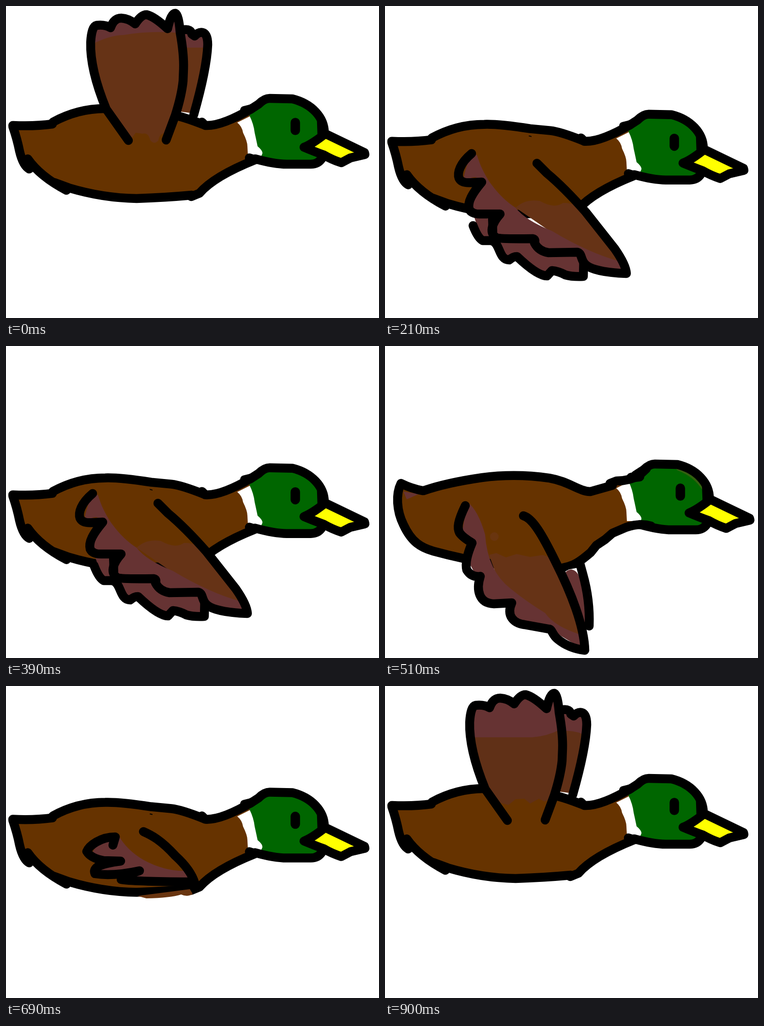
An HTML page with a canvas for the animation above (0.93 s loop, 771 by 645 pixels).

```html
<!DOCTYPE html>
<html lang="en">
<head>
<meta charset="utf-8">
<title>Flying duck</title>
<style>
html, body { margin: 0; width: 100%; height: 100%; overflow: hidden; background: #fff; }
canvas { display: block; }
</style>
</head>
<body>
<canvas id="stage" width="771" height="645"></canvas>
<script>
const ctx = document.getElementById('stage').getContext('2d');
const STEP = 30, FRAMES = 31, TURN = 14, DROP = 65.3;
const BROWN = '#663300', FEATHER = '#663316', TIP = '#663333', GREEN = '#006600';

const fill = (color, d) => {
  ctx.fillStyle = color;
  ctx.fill(new Path2D(d));
};

const line = (d, width = 18.5) => {
  ctx.lineWidth = width;
  ctx.stroke(new Path2D(d));
};

const at = (x, y, draw) => {
  ctx.save();
  ctx.translate(x, y);
  draw();
  ctx.restore();
};

function collar(headX) {
  fill('#fff', 'M478 241Q488 249 490 262Q499 280 499 290L500 309L532 309L520 220Z');
  fill(GREEN, `M503 226Q512 244 514 262Q518 280 520 290Q531 299 530 305L526 314L580 327
    L${630 + headX} 326L${658 + headX} 300L${658 + headX} 250Q${650 + headX} 208 ${592 + headX} 192L540 191Z`);
}

function head() {
  line('M505 214L522 203Q534 191 545 191L592 192C632 202 658 230 658 262');
  line('M652 238L653 265');
  line('M515 316Q555 327 580 327L630 327Q645 327 653 315');
  const beak = 'M616 292Q632 286 660 264L741 303L742 307L712 314L693 324Q674 318 657 308Q640 302 616 292Z';
  fill('#ffff00', beak);
  line(beak);
  line('M598 241V257', 19.5);
}

function bodyA() {
  fill(BROWN, `M14 248L95 244Q150 212 205 212L300 221L360 229L415 247L510 212L515 317
    L465 338L395 388L270 398L100 365L46 325Z`);
  collar(0);
  line('M14 247Q60 249 96 244');
  line('M97 240Q148 212 205 212Q235 211 300 221L342 225Q362 227 410 246');
  line('M405 240L412 247Q445 249 508 212');
  line('M492 215L508 211', 16);
  line('M14 249Q23 275 28 300Q35 330 48 337');
  line('M45 316Q70 352 125 381');
  line('M100 365L130 376Q200 397 270 398Q330 396 384 391');
  line('M383 394L400 387Q430 352 515 318L503 314');
  line('M298 236L302 237', 2);
  head();
}

function bodyB() {
  at(0, -12, () => {
    fill(BROWN, `M33 243L77 257Q150 230 250 226Q350 226 420 259L520 230L525 327
      L490 338L425 385Q395 420 350 419Q270 418 100 383Q20 350 33 243Z`);
    fill(TIP, 'M38 260L70 265L45 276Z');
  });
  collar(12);
  ctx.strokeStyle = '#33600f';
  line('M608 199Q642 212 660 240', 12);
  ctx.strokeStyle = '#000';
  at(0, -12, () => {
    line('M78 258Q55 254 33 243C22 265 24 300 38 328C55 365 75 376 100 383Q225 417 340 420C390 420 405 402 425 386L437 371L455 359L470 346L498 334Q526 324 550 331');
    line('M80 258Q125 242 200 231Q270 222 340 232C380 239 400 259 424 260L470 247');
    line('M465 243L478 238Q505 238 526 226L540 213');
    line('M509 231L526 229', 20);
  });
  at(12.5, 0, head);
}

const nearUp = `M253 278L207 213C182 152 174 108 175 75Q177 42 187 40Q205 38 216 45Q223 25 238 25
  Q254 26 267 37Q280 17 291 18Q307 22 334 47Q341 15 350 15Q357 18 360 55Q368 100 367 130L366 155Q363 185 350 226L331 277`;

function wingUp(color, tips, edge) {
  const far = 'M368 49Q382 47 384 58L390 62Q398 53 407 55Q417 58 417 80Q415 130 388 225';
  fill(color, 'M365 50L390 62L413 56L417 80L388 222L358 218Z');
  fill(TIP, tips[1]);
  line(far);
  fill(color, `M207 213C182 152 174 108 176 75L185 41L216 45L240 25L267 37L291 18L334 47L350 15L367 130L358 200${edge}Z`);
  fill(TIP, tips[0]);
  line(nearUp);
}

const wingUpStart = () => wingUp(FEATHER, [
  'M176 80Q215 60 243 60Q300 50 362 56L350 15L334 47L291 18L267 37L240 25L216 45L185 41Z',
  'M365 50L390 62L413 56L417 86L370 86Z'
], 'L332 264Q318 260 315 278Q306 288 298 277Q294 261 282 264L268 262L258 276L250 272');

const wingUpEnd = () => wingUp('#603017', [
  'M177 106H305Q335 104 364 89L350 15L334 47L291 18L267 37L240 25L216 45L185 41Z',
  'M365 50L390 62L413 56L417 104Q395 91 370 93Z'
], 'L348 230L330 239L318 233L300 243L288 233L270 234L255 246L240 242');

function wingMid(boundary) {
  fill(FEATHER, 'M385 148L430 155L448 168L444 190L460 208L368 259L390 200Z');
  fill(TIP, 'M390 152L430 155L448 168L444 190L460 208L423 222Q416 190 400 176Z');
  line('M390 150L398 148L412 154L434 155L447 164Q442 188 447 196L460 208Q455 216 420 233Q390 250 368 259');
  line('M446 161L447 171', 19);
  fill(FEATHER, `M205 240C215 200 240 160 275 145Q325 112 367 112L385 148L388 182L404 186L350 272
    L325 262L292 276Q275 261 258 248Q242 250 235 263L200 270Z`);
  fill(TIP, `${boundary}L404 186L388 182L385 148L367 112Z`);
  line('M185 296L206 240C216 195 240 165 263 150L275 145C300 125 335 112 367 112Q361 128 370 138L388 148Q384 180 389 185L404 186L382 218C350 272 334 286 300 304');
  line('M366 124L350 143L370 135L381 140', 15);
}

const wingMidDown = () => wingMid('M293 138Q305 170 325 188Q350 207 365 230');
const wingMidUp = () => wingMid('M312 128Q326 162 343 183L376 220');

function wingDown() {
  fill(TIP, 'M185 438L200 485L225 485L255 525L272 518L335 558L350 546L410 558L405 500L235 440Z');
  line('M182 454Q192 480 202 485L220 485C239 490 234 525 257 525Q264 518 273 518Q315 558 335 558L345 547Q358 548 373 556Q387 560 410 559L411 515');
  fill(FEATHER, 'M270 417Q290 398 320 403Q350 420 368 407Q400 407 417 430L480 510L500 553L340 465Z');
  fill(TIP, `M185 300Q205 350 220 369Q243 400 270 417Q290 443 345 465Q420 510 485 528L500 553
    L430 545L400 509L340 510L310 481L230 482L238 430L175 425L200 364L158 362L165 355Z`);
  fill(BROWN, 'M175 315L163 350L185 356L195 352L180 330Z');
  fill(TIP, 'M180 305L171 325Q165 342 163 354L206 354L190 308Z');
  line('M179 305C155 325 149 345 153 356Q158 367 180 365L200 364C180 388 170 405 174 420Q179 431 200 430L238 430C220 450 215 470 230 479Q240 482 305 481Q312 482 309 490Q318 507 338 510L398 509C408 512 404 526 415 535C430 548 470 552 499 553Q498 535 475 502L415 426Q370 375 335 346L314 325');
  line('M222 440L223 466', 18);
}

function wingLow() {
  fill('#fff', 'M362 472L380 462L400 458L405 478Z');
  fill(TIP, 'M368 478Q373 462 386 462Q398 465 401 477L418 520L423 578L408 582Z');
  line('M403 450L409 472Q424 525 422 579');
  fill(FEATHER, 'M215 432L230 428L250 437L272 430L300 436L326 432L350 440Q398 535 413 629L350 590L240 500Z');
  fill(TIP, `M170 322Q193 340 207 390Q212 465 260 502Q292 528 331 552Q350 580 408 598L413 629
    L340 585L265 570L262 531L200 525L197 476L172 468L180 408L160 382Z`);
  fill('#69350f', 'M217 394A9 9 0 1 0 235 394A9 9 0 1 0 217 394Z');
  fill('#fff', 'M176 452L183 465L178 463Z');
  line('M166 330C150 363 149 376 154 386Q160 395 180 407C168 435 166 452 169 463Q179 479 197 476C188 504 194 532 225 533L262 531C250 558 266 573 288 576L338 585C346 585 345 597 357 606Q380 625 413 629C412 580 385 510 352 445C325 390 305 356 286 351');
}

function wingFold() {
  fill('#693510', 'M272 434L290 439Q340 438 362 431Q375 437 386 430L380 420Z');
  fill(TIP, `M232 308Q250 340 285 360Q328 383 370 382L385 400L270 402L245 395L276 382
    L190 388L200 368L237 361L175 350L190 325Z`);
  line('M221 329L226 312C195 312 172 330 167 342Q175 356 202 361L237 362Q205 366 190 373Q180 380 184 388Q220 394 276 382Q250 390 238 400Q260 404 380 405');
  line('M390 407Q382 380 350 351C320 318 300 308 284 301');
}

// first step, body, wing, wing shift
const poses = [
  [0, bodyA, wingUpStart, 0],
  [2, bodyB, wingMidDown, 0],
  [7, bodyA, wingDown, 0],
  [14, bodyB, wingLow, 0],
  [18, bodyB, wingLow, -7],
  [21, bodyA, wingFold, 0],
  [25, bodyB, wingMidUp, 0],
  [29, bodyA, wingUpEnd, 0]
];

function draw(time) {
  const step = Math.floor(time / STEP) % FRAMES;
  const bob = DROP * (step < TURN ? step / TURN : (FRAMES - 1 - step) / (FRAMES - 1 - TURN));
  const [, body, wing, shift] = poses.findLast(pose => pose[0] <= step);
  ctx.fillStyle = '#fff';
  ctx.fillRect(0, 0, 771, 645);
  ctx.strokeStyle = '#000';
  ctx.lineCap = ctx.lineJoin = 'round';
  at(0, bob, body);
  at(0, shift, wing);
}

function tick() {
  draw(performance.now());
  requestAnimationFrame(tick);
}
tick();
</script>
</body>
</html>
```
